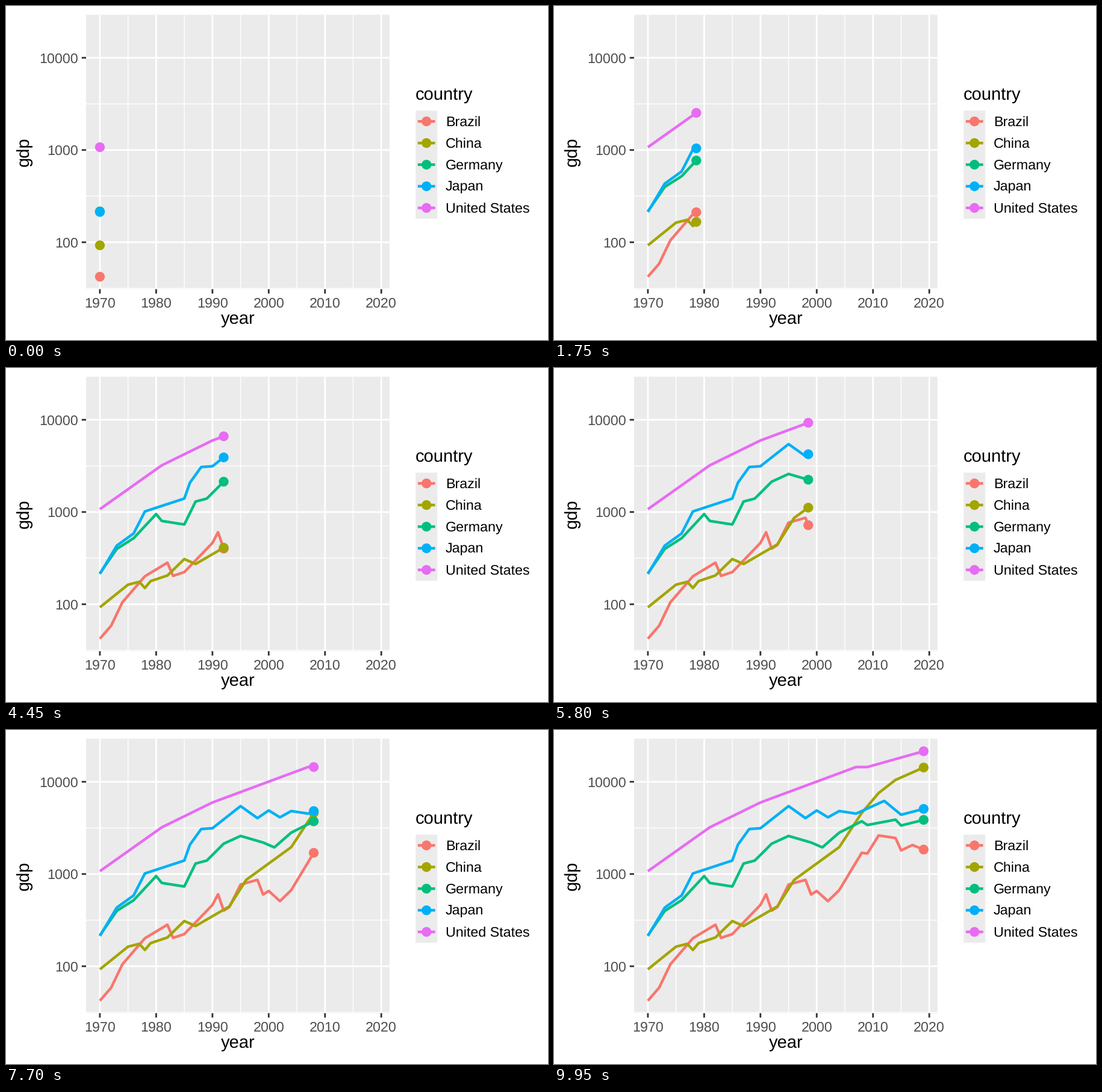
Recreate the animation shown at these times as a matplotlib script. Size 900x556 px, loop 10 s.

```python
import numpy as np
import matplotlib.pyplot as plt
from matplotlib.animation import FuncAnimation
from matplotlib.patches import Circle, Rectangle

plt.rcParams.update({
    "font.family": "Liberation Sans",
    "text.hinting": "none",
    "path.simplify": False,
    "toolbar": "None",
})

W, H, DPI = 900, 556, 150
FRAMES, INTERVAL = 200, 50
PT = 72 / DPI  # points per pixel

LEFT, RIGHT, TOP, BOTTOM = 133.0, 636.7, 14.58, 471.4
GREY, TICK, LABEL = "#EBEBEB", "#333333", "#4D4D4D"
MAJOR, MINOR, LINE = 2.83, 1.42, 4.45
TICK_LEN, DOT = 7.29, 8.14
SMALL, LARGE = 11.2, 14  # font sizes in points

FIRST, SPAN = 1970, 49
LOG_MIN, LOG_MAX = np.log10([42.3, 21433])
PAD = 0.05 * (LOG_MAX - LOG_MIN)

# Turning points: years since 1970 and GDP in billions of dollars,
# with steady growth in between
SERIES = [
    ("Brazil", "#F8766D", {
        0: 42.3, 2: 58.5, 4: 105, 8: 201, 12: 282, 13: 203, 15: 223, 20: 462,
        21: 603, 22: 401, 23: 438, 25: 769, 28: 864, 29: 599, 30: 655, 32: 508,
        34: 669, 38: 1696, 39: 1667, 41: 2616, 44: 2456, 45: 1802, 47: 2063,
        49: 1840}),
    ("China", "#A3A500", {
        0: 92.6, 5: 163, 7: 175, 8: 150, 9: 178, 12: 205, 15: 309, 17: 273,
        23: 445, 26: 864, 34: 1955, 38: 4594, 41: 7551, 44: 10476, 49: 14280}),
    ("Germany", "#00BF7D", {
        0: 216, 3: 398, 6: 520, 10: 950, 11: 800, 15: 732, 17: 1298, 19: 1399,
        22: 2132, 25: 2586, 29: 2194, 31: 1944, 34: 2809, 38: 3730, 39: 3398,
        44: 3884, 45: 3356, 49: 3861}),
    ("Japan", "#00B0F6", {
        0: 213, 3: 432, 6: 586, 8: 1014, 15: 1399, 16: 2079, 18: 3072, 20: 3133,
        25: 5449, 28: 4032, 30: 4887, 32: 4115, 34: 4815, 37: 4515, 42: 6203,
        45: 4389, 49: 5082}),
    ("United States", "#E76BF3", {
        0: 1073, 11: 3207, 20: 5963, 37: 14452, 39: 14449, 49: 21433}),
]


def x_pos(year):
    return LEFT + (year - FIRST + 0.05 * SPAN) / (1.1 * SPAN) * (RIGHT - LEFT)


def y_pos(log_value):
    share = (log_value - LOG_MIN + PAD) / (LOG_MAX - LOG_MIN + 2 * PAD)
    return BOTTOM - share * (BOTTOM - TOP)


fig = plt.figure(figsize=(W / DPI, H / DPI), dpi=DPI, facecolor="white")
ax = fig.add_axes([0, 0, 1, 1])
ax.set(xlim=(0, W), ylim=(H, 0))
ax.axis("off")


def segment(xs, ys, color, width, z):
    line, = ax.plot(xs, ys, color=color, lw=width * PT, zorder=z, snap=False,
                    solid_capstyle="butt", solid_joinstyle="round")
    return line


def box(x, y, w, h):
    ax.add_patch(Rectangle((x, y), w, h, fc=GREY, lw=0, zorder=0, snap=False))


def dot(x, y, color, z):
    return ax.add_patch(Circle((x, y), DOT, fc=color, lw=0, zorder=z))


def label(x, y, text, size, color="black", ha="left", angle=0):
    ax.text(x, y, text, size=size, color=color, ha=ha, va="baseline",
            rotation=angle, rotation_mode="anchor", zorder=5)


def draw_panel():
    box(LEFT, TOP, RIGHT - LEFT, BOTTOM - TOP)
    for log_value in (1.5, 2.5, 3.5):
        segment([LEFT, RIGHT], [y_pos(log_value)] * 2, "white", MINOR, 1)
    for year in range(1975, 2020, 10):
        segment([x_pos(year)] * 2, [TOP, BOTTOM], "white", MINOR, 1)
    for power in (2, 3, 4):
        y = y_pos(power)
        segment([LEFT, RIGHT], [y, y], "white", MAJOR, 2)
        segment([LEFT - TICK_LEN, LEFT], [y, y], TICK, MAJOR, 2)
        label(119.9, y + 8.3, str(10 ** power), SMALL, LABEL, "right")
    for year in range(1970, 2021, 10):
        x = x_pos(year)
        segment([x, x], [TOP, BOTTOM], "white", MAJOR, 2)
        segment([x, x], [BOTTOM, BOTTOM + TICK_LEN], TICK, MAJOR, 2)
        label(x, 502, str(year), SMALL, LABEL, "center")
    label((LEFT + RIGHT) / 2, 528.5, "year", LARGE, ha="center")
    label(37.5, (TOP + BOTTOM) / 2, "gdp", LARGE, ha="center", angle=90)


def draw_legend():
    left, top, key = 680.2, 174.1, 36
    label(left - 0.8, 156, "country", LARGE)
    box(left, top, key, key * len(SERIES))
    for i, (name, color, _) in enumerate(SERIES):
        y = top + key * (i + 0.5)
        segment([left + 0.1 * key, left + 0.9 * key], [y, y], color, LINE, 3)
        dot(left + key / 2, y, color, 4)
        label(left + key + 13.7, y + 7.4, name, SMALL)


def yearly_heights(turns):
    logs = np.log10(list(turns.values()))
    return y_pos(np.interp(years, list(turns), logs))


draw_panel()
draw_legend()

years = np.arange(SPAN + 1)
xs = x_pos(FIRST + years)
# each year is reached on a whole frame
arrival = np.round(years * (FRAMES - 1) / SPAN)
paths = [(segment([], [], color, LINE, 3), dot(0, 0, color, 4),
          yearly_heights(turns)) for _, color, turns in SERIES]


def update(frame):
    passed = arrival <= frame
    head_x = np.interp(frame, arrival, xs)
    for line, head, ys in paths:
        head_y = np.interp(frame, arrival, ys)
        line.set_data(np.append(xs[passed], head_x),
                      np.append(ys[passed], head_y))
        head.center = head_x, head_y
    return [artist for path in paths for artist in path[:2]]


anim = FuncAnimation(fig, update, frames=FRAMES, interval=INTERVAL,
                     repeat=True, repeat_delay=0, blit=False)
plt.show()
```
